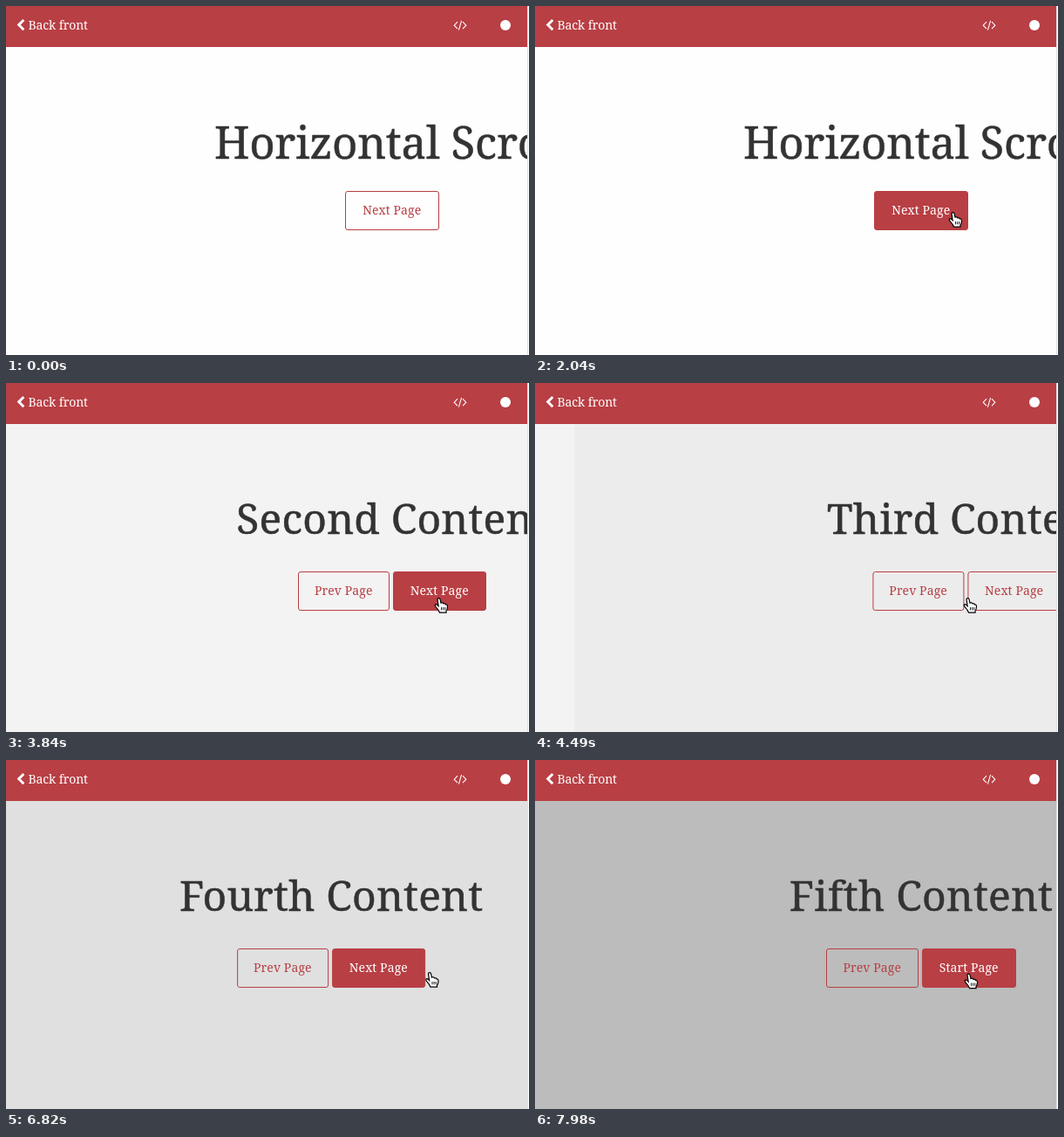
An HTML page that plays this animation: 600x400 px, repeating every 8000 ms.

```html
<!DOCTYPE html>
<html lang="en">
<head>
<meta charset="utf-8">
<title>Horizontal Scroll</title>
<style>
  html, body { margin: 0; width: 100%; height: 100%; overflow: hidden; background: #fefefe; }
  svg { display: block; width: 600px; height: 400px; }
  text { font: 14px "Noto Serif", serif; }
  .title { font-size: 48px; letter-spacing: .2px; fill: #333; stroke: #333; stroke-width: .5; text-anchor: middle; }
  .title.first { font-size: 51px; letter-spacing: -.25px; }
  .label { letter-spacing: .1px; text-anchor: middle; }
  .button { stroke: #b83f44; }
</style>
</head>
<body>
<svg viewBox="0 0 600 400">
  <g id="pages"></g>
  <rect width="598" height="47" fill="#b83f44"/>
  <g fill="none" stroke="#fff">
    <path d="M20.3 16l-5.6 5.6 5.6 5.6" stroke-width="2.9"/>
    <path d="M518 18.2l-3.8 4 3.8 4M524 18.2l3.8 4-3.8 4M522.6 16.8l-3.2 10.8" stroke-width="1.1"/>
  </g>
  <text x="25.5" y="27" fill="#fff" letter-spacing="-.12">Back front</text>
  <circle cx="573" cy="22" r="6" fill="#fff"/>
  <rect x="598" width="2" height="400" fill="#fefefe"/>
  <rect x="598" width="1" height="400" fill="#e0e0e0"/>
  <g id="cursor">
    <path id="arrow" d="M.5 .8V14.5L3.7 11.5 6 16.6 8.4 15.5 6.2 10.6H10.6Z" fill="#000" stroke="#fff"/>
    <g id="hand" stroke="#000">
      <path d="M-2 1.7Q-2 .2-.6 .2T1.1 1.7L2 5.6Q4.2 4.6 4.9 6.4 6.8 5.8 7.3 7.4 9.5 7.1 9.5 9.6 9.5 13 8 14.6V16.7H.6Q-.4 14-3.9 10.2-5.3 8.2-4.4 7.3-2.9 6.8-.9 9Z" fill="#fff" stroke-width="1.2"/>
      <path d="M2.5 10.5v3.3M4.6 10.5v3.3M6.7 10.5v3.3" stroke-width=".9"/>
    </g>
  </g>
</svg>
<script>
const LOOP = 8000, PAGE_WIDTH = 900, PAGE_LEFT = -7, CENTER = 443;
const SCROLL_TIME = 800, FADE_TIME = 170;
const RED = [184, 63, 68], WHITE = [255, 255, 255];

const prev = [335, 105, "Prev Page"], next = [444, 107, "Next Page"];
// hover: when the last button of the page starts to fill
const pages = [
  { title: "Horizontal Scroll", color: "#fefefe", hover: 1440, buttons: [[389, 108, "Next Page"]] },
  { title: "Second Content", color: "#f3f3f3", hover: 3600, buttons: [prev, next] },
  { title: "Third Content", color: "#ececec", hover: 4940, buttons: [prev, next] },
  { title: "Fourth Content", color: "#e0e0e0", hover: 6240, buttons: [prev, next] },
  { title: "Fifth Content", color: "#bcbcbc", hover: 7680, buttons: [[334, 106, "Prev Page"], [444, 108, "Start Page"]] }
];
// [first visible step, time already elapsed by then]
const scrolls = [[2750, 48], [4084, 0], [5540, 26], [6820, 15]];
// [time, x, y]
const cursorPath = [
  [600, 435, 378], [1400, 467, 231], [1460, 467, 231], [2040, 480, 236.5],
  [2160, 472, 236.5], [2280, 472, 236.5], [2450, 459, 233.5], [3610, 459, 233.5],
  [3840, 497, 246.5], [4950, 497, 246.5], [5360, 486.5, 243.5],
  [7690, 486.5, 243.5], [7980, 498, 245]
];

const $ = id => document.getElementById(id);
const clamp = v => Math.min(1, Math.max(0, v));
const mix = (a, b, k) => a + (b - a) * k;

function add(parent, tag, attrs, text = "") {
  const el = document.createElementNS("http://www.w3.org/2000/svg", tag);
  for (const name in attrs) el.setAttribute(name, attrs[name]);
  el.textContent = text;
  return parent.appendChild(el);
}

pages.forEach((page, i) => {
  const g = add($("pages"), "g", { transform: `translate(${i * PAGE_WIDTH})` });
  const top = i ? 216 : 212;
  add(g, "rect", { x: PAGE_LEFT, width: PAGE_WIDTH, height: 400, fill: page.color });
  add(g, "text", { class: i ? "title" : "title first", x: CENTER, y: i ? 172.5 : 175 }, page.title);
  for (const [x, width, label] of page.buttons) {
    page.box = add(g, "rect", {
      class: "button", x: x + .5, y: top + .5, width: width - 1, height: 44, rx: 2.5,
      fill: "#b83f44", "fill-opacity": 0
    });
    page.label = add(g, "text", { class: "label", x: x + width / 2 - .3, y: top + 27, fill: "#b83f44" }, label);
  }
});

function scrollOffset(t) {
  return scrolls.reduce((sum, [at, lead]) => {
    const k = t < at ? 0 : clamp((t - at + lead) / SCROLL_TIME);
    return sum + PAGE_WIDTH * (1 - (1 - k) ** 4);
  }, 0);
}

function cursorAt(t) {
  const i = cursorPath.findIndex(key => key[0] > t);
  if (i < 1) return cursorPath[cursorPath.length - 1].slice(1);
  const [t0, x0, y0] = cursorPath[i - 1], [t1, x1, y1] = cursorPath[i];
  const k = (t - t0) / (t1 - t0), ease = k * k * (3 - 2 * k);
  return [mix(x0, x1, ease), mix(y0, y1, ease)];
}

function draw(now) {
  const t = now % LOOP;
  $("pages").setAttribute("transform", `translate(${-scrollOffset(t)})`);
  for (const { box, label, hover } of pages) {
    const k = clamp((t - hover) / FADE_TIME);
    box.setAttribute("fill-opacity", k);
    label.setAttribute("fill", `rgb(${RED.map((c, i) => mix(c, WHITE[i], k))})`);
  }
  const overButton = t >= 1440;
  $("cursor").setAttribute("transform", `translate(${cursorAt(t)})`);
  $("arrow").style.display = t >= 600 && !overButton ? "" : "none";
  $("hand").style.display = overButton ? "" : "none";
}

function tick() {
  draw(performance.now());
  requestAnimationFrame(tick);
}
tick();
</script>
</body>
</html>
```
